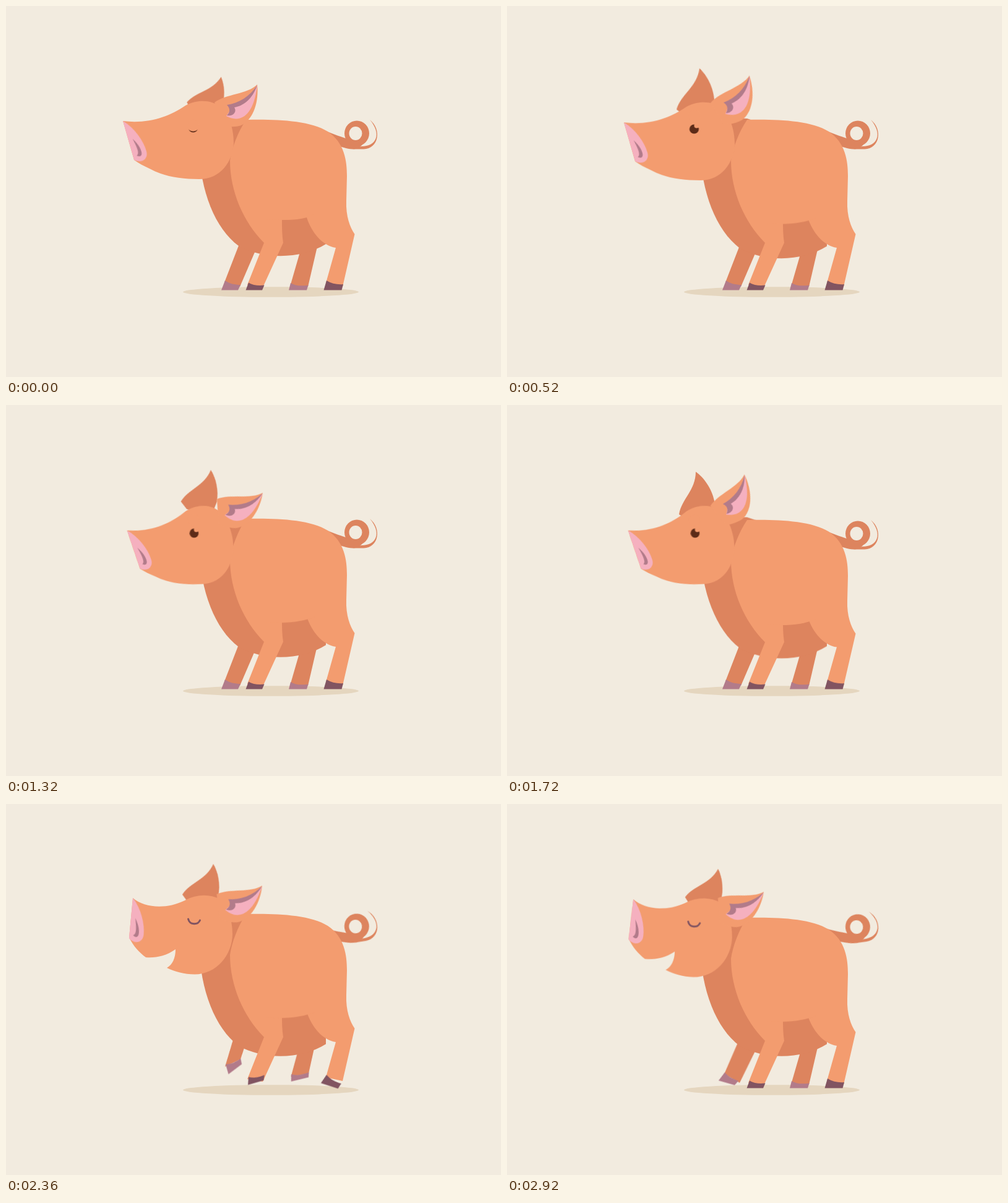
Animation of 800x600 px, one loop 2.96 s. Source, as an HTML page without scripts:

```html
<!DOCTYPE html>
<html lang="en">
<head>
<meta charset="utf-8">
<title>Happy pig</title>
<style>
html, body { margin: 0; width: 100%; height: 100%; overflow: hidden; background: #f2ebdf; }
svg { display: block; width: 100vw; height: 100vh; }
svg * { animation: 2.96s ease-in-out infinite; }
.skin { fill: #f39c6f; }
.shade { fill: #dd845e; }
.pink { fill: #f5b0bf; }
.mauve { fill: #b27b8a; }
.plum { fill: #815461; }
.iris { fill: #5c2b18; }

/* From 63.51% on the pig laughs: up, land, squash, one round every 8.11% */

/* Belly and flank swell downwards together */
.sag { animation-name: sag; }
#belly { transform-origin: 0 230px; }
#flank { transform-origin: 0 53px; }
@keyframes sag {
  0% { transform: none; }
  8.11% { transform: scaleY(1.075); }
  18.92%, 56.76%, 63.51%, 66.22%, 71.62%, 74.32%, 79.73%, 82.43%, 87.84%, 90.54%, 95.95%, 100% { transform: scaleY(1.021); }
  58.11%, 60.81%, 68.58%, 76.69%, 84.8%, 92.91% { transform: scaleY(1.032); }
}
#trunk { transform-origin: 0 460px; animation-name: trunk; }
@keyframes trunk {
  0%, 56.76%, 66.22%, 74.32%, 82.43%, 90.54%, 98.65%, 100% { transform: translateY(0) scaleY(1); }
  58.11%, 60.81%, 68.58%, 76.69%, 84.8%, 92.91% { transform: translateY(0) scaleY(.993); }
  63.51%, 71.62%, 79.73%, 87.84%, 95.95% { transform: translateY(-6px) scaleY(1); }
}
#tail { transform-origin: 515px 203px; animation-name: tail; }
@keyframes tail {
  0%, 56.76% { transform: translateY(0) rotate(0); }
  58.11%, 60.81% { transform: translateY(2px) rotate(0); }
  63.51%, 71.62%, 79.73%, 87.84%, 95.95% { transform: translateY(0) rotate(-9deg); }
  66.22%, 74.32%, 82.43%, 90.54%, 98.65%, 100% { transform: translateY(0) rotate(-8deg); }
  68.58%, 76.69%, 84.8%, 92.91% { transform: translateY(1px) rotate(-4deg); }
}

/* Each foot has its own lift and tilt, around the front of its ankle */
.foot { --land: 0px, 0px; --toe: 0deg; }
.step { animation-name: step; }
.shin, .hoof { transform-origin: var(--ankle); }
.shin { animation-name: shin; }
.hoof { animation-name: hoof; }
#foreFar { --ankle: 354px 444px; --up: 1px, -23px; --tilt: -37deg; --land: -2px, -10px; --toe: 16deg; }
#hindFar { --ankle: 460px 448px; --up: 1px, -11px; --tilt: -13.6deg; }
#foreNear { --ankle: 392px 447.5px; --tilt: -16deg; }
#hindNear { --ankle: 518px 444px; --tilt: 18deg; }
@keyframes step {
  0%, 60.81%, 68.58%, 76.69%, 84.8%, 92.91% { transform: translate(0, 0); }
  63.51%, 71.62%, 79.73%, 87.84%, 95.95% { transform: translate(var(--up)); }
  66.22%, 74.32%, 82.43%, 90.54%, 98.65%, 100% { transform: translate(var(--land)); }
}
@keyframes shin {
  0%, 60.81%, 68.58%, 76.69%, 84.8%, 92.91% { transform: skewY(0deg); }
  63.51%, 71.62%, 79.73%, 87.84%, 95.95% { transform: skewY(var(--tilt)); }
  66.22%, 74.32%, 82.43%, 90.54%, 98.65%, 100% { transform: skewY(var(--toe)); }
}
@keyframes hoof {
  0%, 60.81%, 68.58%, 76.69%, 84.8%, 92.91% { transform: rotate(0deg); }
  63.51%, 71.62%, 79.73%, 87.84%, 95.95% { transform: rotate(var(--tilt)); }
  66.22%, 74.32%, 82.43%, 90.54%, 98.65%, 100% { transform: rotate(var(--toe)); }
}

#head { transform-origin: 315px 216px; animation-name: nod; }
@keyframes nod {
  0%, 63.51%, 71.62%, 79.73%, 87.84%, 95.95% { transform: translate(0, 0) rotate(0deg) scaleX(1); }
  8.11% { transform: translate(1px, 2px) rotate(-5.5deg) scaleX(1); }
  18.92%, 32.43% { transform: translate(0, 2px) rotate(0deg) scaleX(1); }
  39.19%, 60.81% { transform: translate(2px, 9.5px) rotate(-3.5deg) scaleX(.95); }
  66.22%, 74.32%, 82.43%, 90.54%, 98.65%, 100% { transform: translate(-2.4px, 4.7px) rotate(1.4deg) scaleX(1); }
  68.58%, 76.69%, 84.8%, 92.91% { transform: translate(-1px, 6px) rotate(1deg) scaleX(1); }
}
/* Mouth shut, then laughing */
#face { animation-name: face; }
@keyframes face {
  0%, 60.81% { d: path("M189,186 C230,191 264,179 290,161 C310,150 333,152 346,163 C362,177 368,200 368,222 C366,252 347,280 312,280 C290,280 266,277 250,271 C250,271 250,271 250,271 C244,269 238,266 232,263 C223,259 214,254 207,249Z"); }
  63.51%, 100% { d: path("M205,152 C224,168 258,171 289,156 C308,146 328,145 346,154 C360,167 366,190 366,210 C366,244 340,275.5 305,275.5 C288,275.5 273,271 260,265 C269,260 274,249 274,235 C258,246 243,249 226,248 C215,240 206,230 199,216Z"); }
}
#snout { animation-name: snout; }
@keyframes snout {
  0%, 60.81% { transform: translate(189px, 186px) rotate(-16deg); }
  63.51%, 100% { transform: translate(205px, 152px) rotate(5.4deg); }
}
#open { animation-name: open; }
@keyframes open { 0%, 62% { opacity: 1; } 62.01%, 100% { opacity: 0; } }
#smile { animation-name: smile; }
@keyframes smile { 0%, 62% { opacity: 0; } 62.01%, 100% { opacity: 1; } }
#lid { animation-name: lid; }
@keyframes lid {
  0%, 61%, 100% { transform: none; }
  3.5%, 58.11% { transform: translateY(-18px); }
}

/* Ears swing around their roots */
#farEar { animation-name: farEar; }
@keyframes farEar {
  0% { transform: translate(324px, 170px) rotate(32deg) scale(.93); }
  8.11% { transform: translate(304px, 171.6px) rotate(-18deg) scale(1.17); }
  24.32%, 45% { transform: translate(317px, 165px) rotate(22deg) scale(.95); }
  52%, 58.11% { transform: translate(315px, 172px) rotate(0deg) scale(1); }
  60.81%, 68.58%, 76.69%, 84.8%, 92.91% { transform: translate(319px, 158px) rotate(8deg) scale(1.08); }
  63.51%, 71.62%, 79.73%, 87.84%, 95.95% { transform: translate(319px, 156.4px) rotate(24deg) scale(.95); }
  66.22%, 74.32%, 82.43%, 90.54%, 98.65%, 100% { transform: translate(321px, 163px) rotate(28deg) scale(.95); }
}
#nearEar { animation-name: nearEar; }
@keyframes nearEar {
  0% { transform: translate(358px, 172px) rotate(0deg) scale(1); }
  8.11% { transform: translate(347.4px, 159px) rotate(-62deg) scale(1.07); }
  29.73%, 37.84% { transform: translate(358px, 175px) rotate(1deg) scale(1); }
  52%, 58.11% { transform: translate(354px, 171px) rotate(-20deg) scale(1); }
  60.81%, 68.58%, 76.69%, 84.8%, 92.91% { transform: translate(356px, 168px) rotate(-4deg) scale(1); }
  63.51%, 71.62%, 79.73%, 87.84%, 95.95% { transform: translate(357.7px, 166px) rotate(12deg) scale(1); }
  24.32%, 45%, 66.22%, 74.32%, 82.43%, 90.54%, 98.65%, 100% { transform: translate(357px, 173px) rotate(15deg) scale(1); }
}
</style>
</head>
<body>
<svg viewBox="0 0 800 600">
  <ellipse cx="428" cy="462.5" rx="142" ry="8.3" fill="#e5d6bf"/>
  <g id="foreFar" class="foot">
    <g class="step">
      <path class="shade shin" d="M353,447 L382,372 L412,375 L378,454Z"/>
      <path class="mauve hoof" d="M354,444 C361,449 370,451 379,451 L375,459.5 L348,459.5Z"/>
    </g>
  </g>
  <g id="hindFar" class="foot">
    <g class="step">
      <path class="shade shin" d="M459.5,452 L478,388 L504,385 L488,454Z"/>
      <path class="mauve hoof" d="M460,448 C468,453 479,453 488.5,451.5 L486,459.5 L457,459.5Z"/>
    </g>
  </g>
  <path id="belly" class="shade sag" d="M312,230 C314,300 338,360 376,388 C418,411 478,409 517,385 L517,330 L440,200 L388,183 L352,182Z"/>
  <g id="tail" class="shade">
    <path fill-rule="evenodd" d="M547,206 a20,20.5 0 1 1 40,0 a20,20.5 0 1 1 -40,0Z M554.5,206 a10.5,11 0 1 0 21,0 a10.5,11 0 1 0 -21,0Z"/>
    <path d="M505,197 C525,206 540,211 549,214 C556,220 568,220 580,214 C578,226 570,231.5 560,231.5 C550,231 543,228 530,224Z"/>
    <path d="M574,227 C600,227 607,206 588,184 C608,200 602,231 578,231.5 L560,231.5Z"/>
  </g>
  <g id="trunk">
    <path class="skin" d="M388,184 C430,183 490,184 520,203 C547,221 551,250 551,275 L550,315 C549,340 556,358 563.5,369 L544,454 L517,448 L533,391 C512,388 494,367 486,342 C472,346 458,346 446,346 C446,358 446,370 448,383 L415,455 L390,451 L417,383 C384,350 362,300 362,250 C365,230 374,205 388,184Z"/>
    <path id="flank" class="skin sag" d="M420,300 V345 Q470,349 500,336 V300Z"/>
    <g id="foreNear" class="foot">
      <path class="plum hoof" d="M392,447.5 C399,452 409,452.5 417.5,451.5 L414,459.5 L387.5,459.5Z"/>
    </g>
    <g id="hindNear" class="foot">
      <path class="plum hoof" d="M518,444 C526,449 536,451 545,450 L542.5,459.5 L513.5,459.5Z"/>
    </g>
  </g>
  <path id="farEar" class="shade" d="M-37,5 C-33,-20 -10,-34 -10,-64 C3,-55 16,-37 20,-17 L20,8 L-23,13Z"/>
  <g id="head">
    <path id="face" class="skin"/>
    <g id="snout">
      <path class="pink" d="M0,0 C15,16 23,40 23,57 C23,70 11,75 0,65.5Z"/>
      <path class="mauve" d="M7,32 C12,40 15,48 15,55 C15,63 11,64 6,60 C12,58 10,46 7,32Z"/>
    </g>
    <g id="open" transform="translate(302.5 197)">
      <circle class="iris" r="7.6"/>
      <circle class="skin" cx="4" cy="-5.5" r="4"/>
      <ellipse id="lid" class="skin" cy="-3.5" rx="10" ry="9.3"/>
    </g>
    <path id="smile" d="M294.5,186 C297,196 310,196 313.5,188" fill="none" stroke="#815461" stroke-width="3" stroke-linecap="round"/>
  </g>
  <g id="nearEar">
    <path class="skin" d="M-21,-16 C-3,-30 32,-29 48,-45 C51,-17 42,10 24,20 C17,24 4,24 -8,22Z"/>
    <path class="pink" d="M-2,6 C18,17 42,10 48,-44 C34,-22 17,-12 6,-6Z"/>
    <path class="mauve" d="M-1,-12 C19,-15 36,-26 48,-44 C40,-20 24,-10 11,-8 C16,0 8,7 -1,5 C4,0 5,-6 -1,-12Z"/>
  </g>
</svg>
</body>
</html>
```
